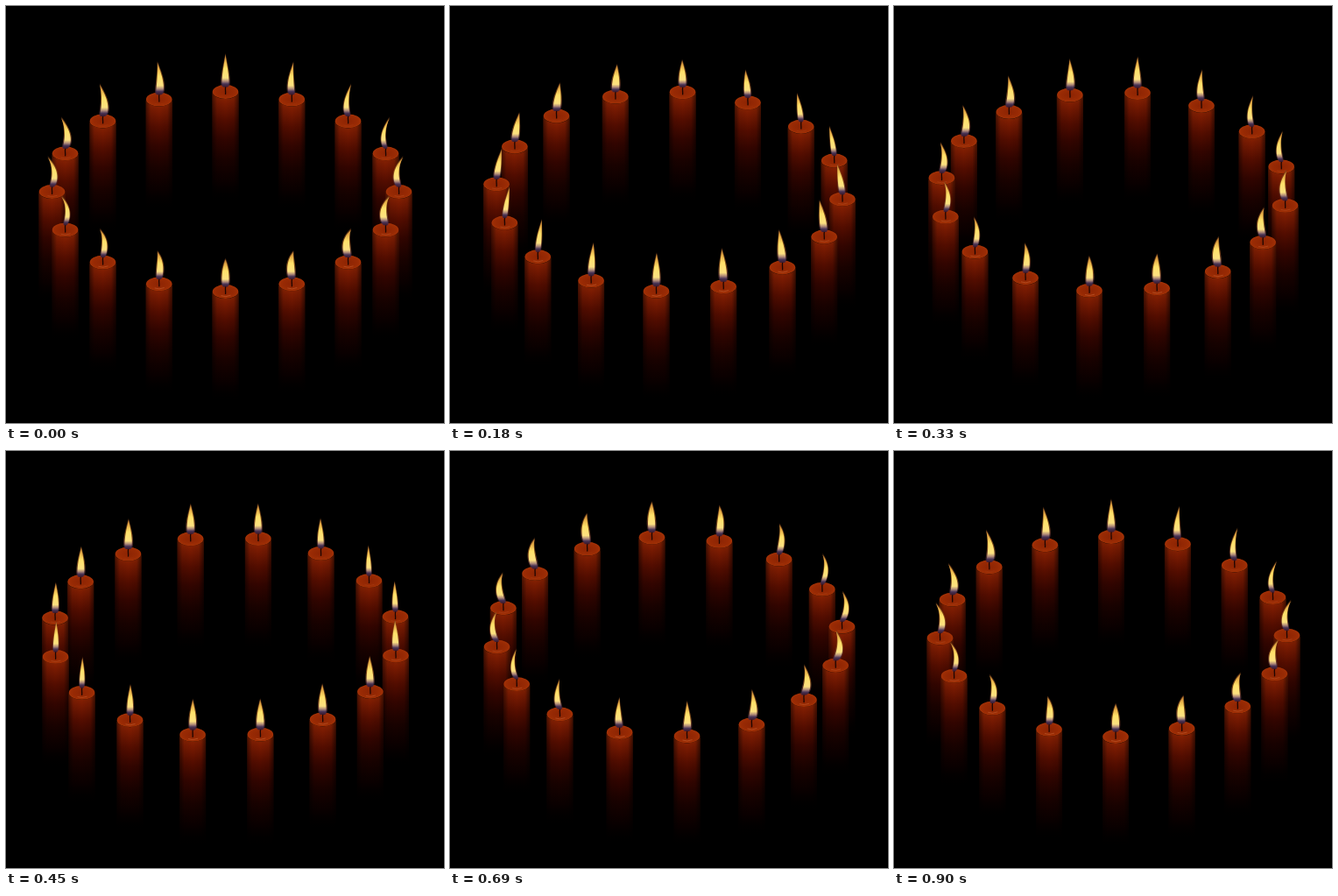
Animation, 500 px wide and 476 px high, one loop 930 ms. Source, as an HTML page:

```html
<!DOCTYPE html>
<html>
<head>
<meta charset="utf-8">
<style>
html, body { margin: 0; width: 100%; height: 100%; overflow: hidden; background: #000; }
svg { display: block; width: 100vw; height: 100vh; }
</style>
</head>
<body>
<svg id="stage" viewBox="0 0 500 476">
  <defs>
    <linearGradient id="wax" x1="0" y1="0" x2="0" y2="1">
      <stop offset="0" stop-color="#942803"/>
      <stop offset=".1" stop-color="#7a1b02"/>
      <stop offset=".25" stop-color="#540d00"/>
      <stop offset=".42" stop-color="#350500" stop-opacity=".95"/>
      <stop offset=".62" stop-color="#1c0200" stop-opacity=".9"/>
      <stop offset=".82" stop-color="#0c0000" stop-opacity=".8"/>
      <stop offset="1" stop-color="#000" stop-opacity="0"/>
    </linearGradient>
    <linearGradient id="shade">
      <stop offset="0" stop-color="#000" stop-opacity=".5"/>
      <stop offset=".18" stop-color="#000" stop-opacity=".08"/>
      <stop offset=".5" stop-color="#000" stop-opacity="0"/>
      <stop offset=".82" stop-color="#000" stop-opacity=".1"/>
      <stop offset="1" stop-color="#000" stop-opacity=".55"/>
    </linearGradient>
    <radialGradient id="pool">
      <stop offset="0" stop-color="#8c2403"/>
      <stop offset=".7" stop-color="#982a04"/>
      <stop offset="1" stop-color="#a03006"/>
    </radialGradient>
    <linearGradient id="halo" x1="0" y1="0" x2="0" y2="1">
      <stop offset="0" stop-color="#6b3a18" stop-opacity=".75"/>
      <stop offset=".5" stop-color="#9a5a1e" stop-opacity=".8"/>
      <stop offset=".78" stop-color="#6a3c30" stop-opacity=".8"/>
      <stop offset="1" stop-color="#33204a" stop-opacity=".6"/>
    </linearGradient>
    <linearGradient id="fire" x1="0" y1="0" x2="0" y2="1">
      <stop offset="0" stop-color="#b87430"/>
      <stop offset=".2" stop-color="#e8b048"/>
      <stop offset=".42" stop-color="#ffe16a"/>
      <stop offset=".72" stop-color="#fce080"/>
      <stop offset=".82" stop-color="#b08a78"/>
      <stop offset=".9" stop-color="#4c3658"/>
      <stop offset="1" stop-color="#2a1430" stop-opacity=".6"/>
    </linearGradient>
    <filter id="soft" x="-40%" y="-10%" width="180%" height="120%">
      <feGaussianBlur stdDeviation=".5"/>
    </filter>
    <g id="candle">
      <path d="M-15 0V126H15V0A15 8 0 0 1-15 0Z" fill="url(#wax)"/>
      <path d="M-15 0V126H15V0A15 8 0 0 1-15 0Z" fill="url(#shade)"/>
      <ellipse rx="14.8" ry="7.9" fill="url(#pool)"/>
      <ellipse rx="14.3" ry="7.4" fill="none" stroke="#b8400f" stroke-width=".7" opacity=".25"/>
      <path d="M0 3C.6 0-.6-2 .2-6" fill="none" stroke="#1c0502" stroke-width="1.3"/>
    </g>
  </defs>
  <rect width="500" height="476" fill="#000"/>
</svg>
<script>
const NS = "http://www.w3.org/2000/svg";
const COUNT = 16, STEPS = 31, STEP_MS = 30;
const CX = 250.5, CY = 212, RX = 198, RY = 114, TILT = RY / RX;
const BASE = 5.5, HEIGHT = 40, SAMPLES = 18;
const BROADSIDE = -0.44; // ring angle at which the flat flame faces the viewer

// step, radial offset of the flame's middle, radial offset of its tip
const sway = [
  [0, -2.6, 5], [6, -2.5, -6], [11, -3, 1.6], [15, -.6, -.8],
  [19, -4, -2.4], [23, 5, .4], [30, -2.4, 5]
];

const stage = document.getElementById("stage");

function add(parent, tag, attrs) {
  const el = document.createElementNS(NS, tag);
  for (const k in attrs) el.setAttribute(k, attrs[k]);
  return parent.appendChild(el);
}

// Periodic cubic through the sway points
function swayAt(step, col) {
  const n = sway.length;
  const key = j => {
    const lap = Math.floor(j / n), p = sway[j - lap * n];
    return [p[0] + lap * STEPS, p[col]];
  };
  let j = n - 1;
  while (sway[j][0] > step) j--;
  const [a, b, c, d] = [key(j - 1), key(j), key(j + 1), key(j + 2)];
  const span = c[0] - b[0], u = (step - b[0]) / span;
  const m1 = (c[1] - a[1]) / (c[0] - a[0]) * span;
  const m2 = (d[1] - b[1]) / (d[0] - b[0]) * span;
  const u2 = u * u, u3 = u2 * u;
  return (2 * u3 - 3 * u2 + 1) * b[1] + (u3 - 2 * u2 + u) * m1 +
    (3 * u2 - 2 * u3) * c[1] + (u3 - u2) * m2;
}

function flamePath(angle, mid, tip, width, top) {
  const left = [], right = [];
  for (let i = 0; i <= SAMPLES; i++) {
    const s = i / SAMPLES;
    const r = mid * 4 * s * (1 - s) + tip * s * (2 * s - 1);
    const x = r * Math.sin(angle);
    const y = -BASE - (top - BASE) * s - r * TILT * Math.cos(angle);
    const w = width * 1.95 * Math.pow(s + .01, .28) * (1 - s);
    left.push((x - w).toFixed(2) + " " + y.toFixed(2));
    right.unshift((x + w).toFixed(2) + " " + y.toFixed(2));
  }
  return "M" + left.concat(right).join("L") + "Z";
}

const depthOf = slot => Math.cos(slot * 2 * Math.PI / COUNT);

const candles = [...Array(COUNT).keys()]
  .sort((a, b) => depthOf(b) - depthOf(a))
  .map(slot => {
    const g = add(stage, "g", {});
    add(g, "use", { href: "#candle" });
    const gleam = add(g, "path", {
      d: "M-5 4.6Q0 6.8 6 4.2", fill: "none", stroke: "#d2703c", "stroke-width": 1
    });
    const flame = add(g, "g", { filter: "url(#soft)" });
    const halo = add(flame, "path", { fill: "url(#halo)" });
    const fire = add(flame, "path", { fill: "url(#fire)" });
    return { slot, g, gleam, halo, fire };
  });

function draw(step) {
  const mid = swayAt(step, 1), tip = swayAt(step, 2);
  for (const c of candles) {
    const angle = (c.slot + step / STEPS) * 2 * Math.PI / COUNT;
    const depth = Math.cos(angle);
    const x = CX + RX * Math.sin(angle), y = CY - RY * depth;
    const width = 3.3 + 2.2 * Math.abs(Math.cos(angle - BROADSIDE));
    c.g.setAttribute("transform", `translate(${x.toFixed(2)} ${y.toFixed(2)})`);
    c.gleam.setAttribute("opacity", (.26 - .22 * depth).toFixed(2));
    c.halo.setAttribute("d", flamePath(angle, mid, tip, width, HEIGHT + 1));
    c.fire.setAttribute("d", flamePath(angle, mid, tip, width * .76, HEIGHT - .5));
  }
}

let start = null, last = -1;
function tick(now) {
  if (start === null) start = now;
  const step = Math.floor((now - start) / STEP_MS) % STEPS;
  if (step !== last) draw(last = step);
  requestAnimationFrame(tick);
}
draw(0);
requestAnimationFrame(tick);
</script>
</body>
</html>
```
